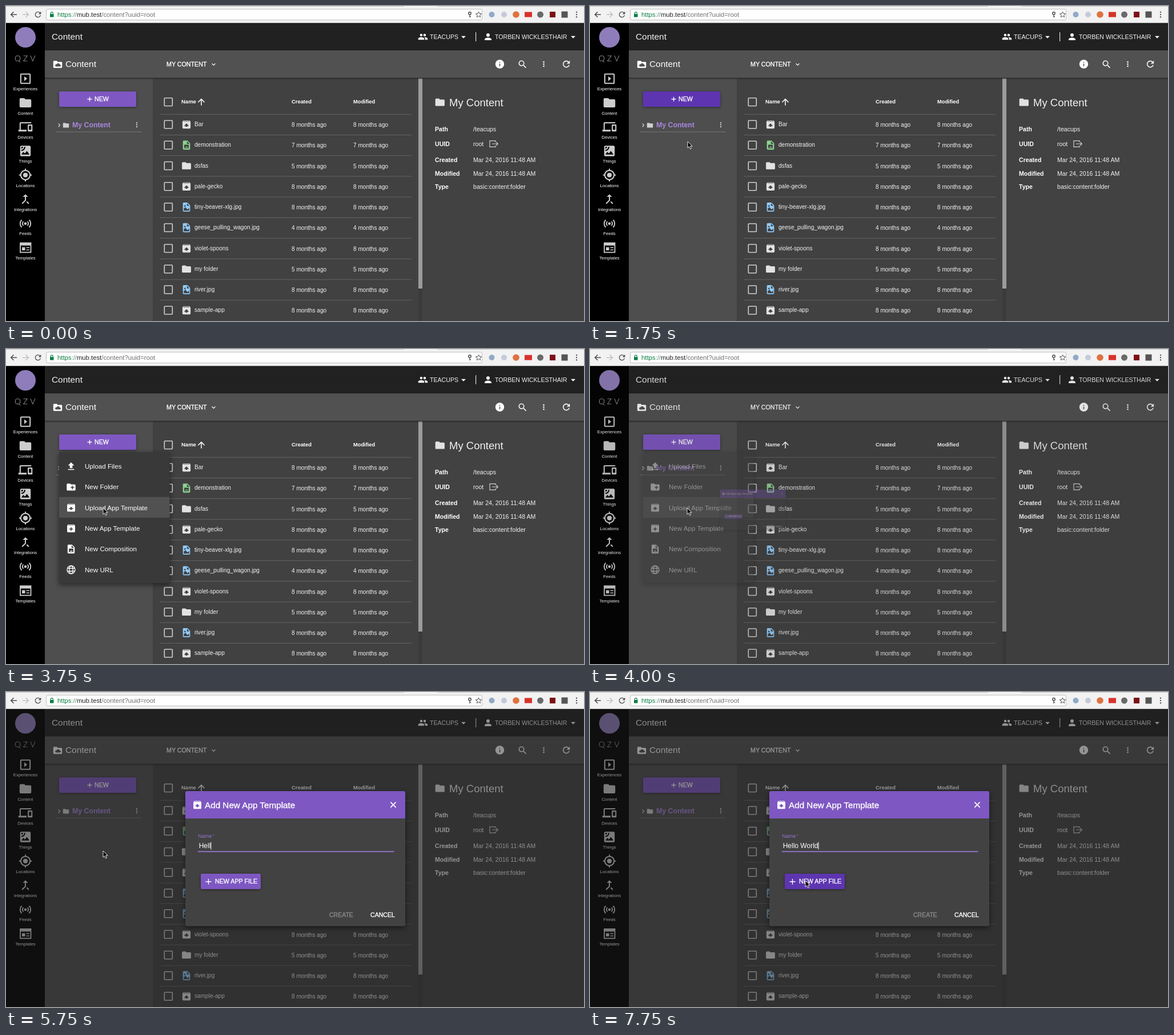
Animation, 1012 px wide and 553 px high, one loop 8 s. Source, as an HTML page:

```html
<!DOCTYPE html>
<html lang="en">
<head>
<meta charset="utf-8">
<title>Content manager</title>
<style>
  html, body { margin: 0; width: 100%; height: 100%; overflow: hidden; background: #424242; }
  svg { display: block; width: 100%; height: 100%; }
  text { font-family: "Liberation Sans", Arial, sans-serif; white-space: pre; }
  .b { font-weight: bold; }
  .m { stroke: currentColor; stroke-width: .35px; }
  .thin { font-family: Lato, "Liberation Sans", sans-serif; font-weight: 300; letter-spacing: 4px; }
  .lift { filter: drop-shadow(0 1px 2px rgba(0,0,0,.45)); }
  .high { filter: drop-shadow(0 3px 5px rgba(0,0,0,.5)); }
</style>
</head>
<body>
<svg id="stage" viewBox="0 0 1012 553"></svg>
<script>
const LOOP = 8000;
const PURPLE = '#7e57c2', DEEP = '#5e35b1', ACCENT = '#9575cd';

// Icon shapes on a 24 unit grid
const BOX = 'M20.55 5.22l-1.39-1.68C18.88 3.21 18.47 3 18 3H6c-.47 0-.88.21-1.15.55L3.46 5.22C3.17 5.57 3 6.01 3 6.5V19c0 1.1.89 2 2 2h14c1.1 0 2-.9 2-2V6.5c0-.49-.17-.93-.45-1.28zM5.12 5l.82-1h12l.93 1z';
const PAGE = 'M14 2H6c-1.1 0-2 .9-2 2v16c0 1.1.9 2 2 2h12c1.1 0 2-.9 2-2V8zM13 3.5V9h5.5z';
const FOLDER = 'M10 4H4c-1.1 0-2 .9-2 2v12c0 1.1.9 2 2 2h16c1.1 0 2-.9 2-2V8c0-1.1-.9-2-2-2h-8z';
const FRAME = 'M19 3H5c-1.1 0-2 .9-2 2v14c0 1.1.9 2 2 2h14c1.1 0 2-.9 2-2V5c0-1.1-.9-2-2-2z';
const SHAPES = {
  folder: FOLDER,
  folderAdd: FOLDER + 'M19 14h-3v3h-2v-3h-3v-2h3V9h2v3h3z',
  folderCloud: FOLDER + 'M8 17h9a2.3 2.3 0 0 0 0-4.6 4 4 0 0 0-7.6-.6A2.7 2.7 0 0 0 8 17z',
  box: BOX + 'M12 9.5l5.5 5.5H14v2h-4v-2H6.5z',
  boxAdd: BOX + 'M11 9.5h2v3h3v2h-3v3h-2v-3H8v-2h3z',
  photo: PAGE + 'M6 20h12v-6l-3.5 3.5L9.5 12 6 15.5zM7 8h3v3H7z',
  scene: PAGE + 'M7 11h10v8H7zM8.5 17.5h7l-2.3-3-1.7 2-1.2-1.3z',
  play: FRAME + 'M19 19H5V5h14zM10 8v8l5-4z',
  things: FRAME + 'M5 5h3a3 3 0 0 1-3 3zM5 12v-2a5 5 0 0 0 5-5h2a7 7 0 0 1-7 7zM5 18l3.5-4.5 2.5 3 3.5-4.5 4.5 6z',
  devices: 'M4 6h18V4H4c-1.1 0-2 .9-2 2v11H0v3h14v-3H4zM23 8h-6a1 1 0 0 0-1 1v10a1 1 0 0 0 1 1h6a1 1 0 0 0 1-1V9a1 1 0 0 0-1-1zM22 17h-4v-7h4z',
  target: 'M12 8a4 4 0 1 0 0 8 4 4 0 0 0 0-8zM20.94 11A9 9 0 0 0 13 3.06V1h-2v2.06A9 9 0 0 0 3.06 11H1v2h2.06A9 9 0 0 0 11 20.94V23h2v-2.06A9 9 0 0 0 20.94 13H23v-2zM12 19a7 7 0 1 1 0-14 7 7 0 0 1 0 14z',
  merge: 'M17 20.4l1.4-1.4-3.4-3.4-1.4 1.4zM7.5 8H11v5.6L5.6 19 7 20.4l6-6V8h3.5L12 3.5z',
  upload: 'M9 16h6v-6h4l-7-7-7 7h4zM5 18h14v2H5z',
  search: 'M15.5 14h-.8l-.3-.3A6.5 6.5 0 1 0 9.5 16c1.6 0 3.1-.6 4.2-1.6l.3.3v.8l5 5 1.5-1.5zM9.5 14a4.5 4.5 0 1 1 0-9 4.5 4.5 0 0 1 0 9z',
  info: 'M12 2a10 10 0 1 0 0 20 10 10 0 0 0 0-20zM13 17h-2v-6h2zM13 9h-2V7h2z',
  reload: 'M17.65 6.35A8 8 0 1 0 19.73 14h-2.08A6 6 0 1 1 16.22 7.78L13 11h7V4z',
  person: 'M12 12a4 4 0 1 0 0-8 4 4 0 0 0 0 8zM12 14c-2.67 0-8 1.34-8 4v2h16v-2c0-2.66-5.33-4-8-4z',
  people: 'M16 11a3 3 0 1 0 0-6 3 3 0 0 0 0 6zM8 11a3 3 0 1 0 0-6 3 3 0 0 0 0 6zM8 13c-2.33 0-7 1.17-7 3.5V19h14v-2.5C15 14.17 10.33 13 8 13zM16 13l-1 .05c1.2.84 2 1.97 2 3.45V19h6v-2.5c0-2.33-4.67-3.5-7-3.5z'
};

const rect = (x, y, w, h, fill, extra = '') =>
  `<rect x="${x}" y="${y}" width="${w}" height="${h}" fill="${fill}" ${extra}/>`;
const dot = (x, y, r, fill) => `<circle cx="${x}" cy="${y}" r="${r}" fill="${fill}"/>`;
const line = (d, color = '#fff', w = 1.5) =>
  `<path d="${d}" fill="none" stroke="${color}" stroke-width="${w}"/>`;
const text = (x, y, s, size, fill = '#f2f2f2', cls = '', extra = '') =>
  `<text x="${x}" y="${y}" font-size="${size}" fill="${fill}" color="${fill}" class="${cls}" ${extra}>${s}</text>`;
const icon = (name, cx, cy, size, fill = '#fff') =>
  `<path transform="translate(${cx - size / 2} ${cy - size / 2}) scale(${size / 24})" fill="${fill}" fill-rule="evenodd" d="${SHAPES[name]}"/>`;
const dots = (x, y, gap, r, fill) => [-gap, 0, gap].map(d => dot(x, y + d, r, fill)).join('');
const plus = (x, y, r) => line(`M${x - r} ${y}h${2 * r}M${x} ${y - r}v${2 * r}`, '#fff', 1.3);
const caretDown = x => `<path d="M${x} 52.7h8l-4 4z" fill="#fff"/>`;
const checkbox = y => rect(277.3, y - 7, 14, 14, 'none', 'stroke="#cfcfcf" stroke-width="1.6" rx="1"');

function star(cx, cy, r) {
  const pts = Array.from({ length: 10 }, (_, i) => {
    const a = i * Math.PI / 5, k = i % 2 ? r * .45 : r;
    return `${cx + k * Math.sin(a)},${cy - k * Math.cos(a)}`;
  });
  return `<polygon points="${pts.join(' ')}" fill="none" stroke="#555" stroke-width="1"/>`;
}

function browserBar() {
  return rect(0, 0, 1012, 30, '#f2f2f2') +
    rect(0, 0, 697, 1, '#c4c4c4') + rect(756, 0, 256, 1, '#c4c4c4') +
    rect(0, 29, 1012, 1, '#b5b5b5') +
    line('M19 15H9M13.5 10.2L8.7 15l4.8 4.8', '#4d4d4d', 1.6) +
    line('M29 15h10M34.5 10.2l4.8 4.8-4.8 4.8', '#c2c2c2', 1.6) +
    icon('reload', 56, 15, 16, '#4d4d4d') +
    rect(70.5, 5.5, 763, 19, '#fff', 'rx="2.5" stroke="#c0c0c0"') +
    rect(77, 14, 6.5, 5.5, '#0b8043', 'rx=".6"') +
    line('M78.3 14.5v-2a1.9 1.9 0 0 1 3.8 0v2', '#0b8043', 1.2) +
    text(90, 19, '<tspan fill="#0b8043">https</tspan><tspan fill="#5c8f73">://</tspan><tspan fill="#222">mub.test</tspan>/content?uuid=root', 11.3, '#707070') +
    `<circle cx="812" cy="12.8" r="2.2" fill="none" stroke="#555" stroke-width="1.6"/>` +
    line('M812 15v5M812 18.6h2', '#555', 1.4) + star(827.5, 15.3, 5.4) +
    dot(850.5, 15, 5, '#91a9c8') + dot(872, 15, 5, '#c6c9dc') + dot(893, 15, 5.8, '#e0713f') +
    rect(908, 10.5, 13, 9, '#d8322a') + dot(935.5, 15, 5.5, '#6a6a6a') +
    rect(952, 10, 10, 10, '#7d1216') + rect(972.5, 9.5, 11, 11, '#555') +
    dots(999, 15, 4.2, 1.2, '#555');
}

function sideNav() {
  const g = '#cdcdcd';
  const items = [['Experiences', 'play'], ['Content', 'folder'], ['Devices', 'devices'], ['Things', 'things'],
    ['Locations', 'target'], ['Integrations', 'merge'], ['Feeds'], ['Templates']];
  const waves = [5, 9].map(r => {
    const k = r * .72;
    return `M${34 - k} ${382 - k}A${r} ${r} 0 0 0 ${34 - k} ${382 + k}M${34 + k} ${382 - k}A${r} ${r} 0 0 1 ${34 + k} ${382 + k}`;
  }).join('');
  return rect(0, 30, 68, 523, '#000') + dot(34, 55, 18, '#8f7dbb') +
    text(15, 96.5, 'QZV', 14, '#c4c4c4', 'thin') +
    items.map(([label, shape], i) => {
      const y = 127.6 + i * 42.3;
      return (shape ? icon(shape, 34, y, 24.5, g) : '') +
        text(34, y + 20.8, label, 7.7, '#fff', '', 'text-anchor="middle"');
    }).join('') +
    dot(34, 382, 2.3, g) + line(waves, g, 1.9) +
    rect(25, 416, 18.5, 16.5, 'none', `stroke="${g}" stroke-width="1.8"`) + rect(25, 416, 18.5, 4.5, g) +
    rect(28, 423.5, 5.5, 5.5, g) + line('M35.5 424.3h5.5M35.5 428.2h5.5', g, 1.5);
}

function headers() {
  return rect(68, 30, 944, 48, '#212121') + text(80, 59, 'Content', 15.4) +
    icon('people', 730, 54, 18) + text(742, 58, 'TEACUPS', 10.6) + caretDown(797) +
    rect(822, 46, 1.2, 16, '#ddd') +
    icon('person', 844, 54, 18) + text(856, 58, 'TORBEN WICKLESTHAIR', 10.6) + caretDown(989) +
    rect(68, 78, 944, 48, '#515151') +
    icon('folderCloud', 90.5, 102.5, 18.5) + text(104, 107, 'Content', 15.4, '#fff') +
    text(281, 106, 'MY CONTENT', 10.7, '#fff', 'm') + line('M360.5 101l3 3 3-3', '#eee', 1.3) +
    icon('info', 864.5, 102, 18.5) + icon('search', 904.5, 102.5, 18.5) +
    dots(941.5, 102, 3.8, 1.3, '#fff') + icon('reload', 981, 102, 18.5);
}

function tree() {
  return rect(68, 126, 189, 427, '#4e4e4e') +
    rect(93, 150, 135, 27, PURPLE, 'id="newBtn" rx="2" class="lift"') +
    plus(146.5, 163.5, 4) + text(155, 167, 'NEW', 10.7, '#fff', 'm') +
    line('M91.5 206.3l3 3-3 3', '#ddd', 1.2) + icon('folder', 105, 209.3, 12.5, '#cfcfcf') +
    text(116, 212.5, 'My Content', 12.3, '#a886de', 'b') + dots(229, 208.7, 3.5, 1.1, '#ddd') +
    rect(87, 220.5, 151, 1, '#777');
}

function fileList() {
  const light = '#e2e2e2', blue = '#90caf9', green = '#8bd08f';
  const rows = [['Bar', 'box', 8], ['demonstration', 'scene', 7, green], ['dsfas', 'folder', 5],
    ['pale-gecko', 'box', 8], ['tiny-beaver-xlg.jpg', 'photo', 8, blue],
    ['geese_pulling_wagon.jpg', 'photo', 4, blue], ['violet-spoons', 'box', 8],
    ['my folder', 'folder', 5], ['river.jpg', 'photo', 8, blue], ['sample-app', 'box', 8]];
  return rect(257, 126, 465, 427, '#414141') + checkbox(168.5) +
    text(307, 171, 'Name', 9.5, '#fff', 'b') + line('M342 174.5v-11M336.5 169l5.5-5.6 5.5 5.6', '#fff', 1.5) +
    text(500, 171, 'Created', 9.4, '#fff', 'b') + text(608, 171, 'Modified', 9.3, '#fff', 'b') +
    rows.map(([name, shape, age, color = light], i) => {
      const y = 208 + i * 36.25, when = age + ' months ago';
      return rect(269, y - 18.3, 441, 1, '#646464') + checkbox(y) + icon(shape, 316, y, 19, color) +
        text(330, y + 3.2, name, 10.1) + text(500, y + 4, when, 10.1) + text(608, y + 4, when, 10.1);
    }).join('') +
    rect(722, 126, 7, 427, '#3b3b3b') + rect(722, 126, 7, 370, '#9b9b9b');
}

function details() {
  const rows = [['Path', '/teacups', 219.7], ['UUID', 'root', 245.5], ['Created', 'Mar 24, 2016 11:48 AM', 274.3],
    ['Modified', 'Mar 24, 2016 11:48 AM', 297.7], ['Type', 'basic:content:folder', 321.3]];
  return rect(729, 126, 283, 427, '#424242') + icon('folder', 759.8, 169, 19.5, '#e2e2e2') +
    text(776, 175.5, 'My Content', 18.5) +
    rows.map(([k, v, y]) => text(751, y, k, 10.6, '#fff', 'b') + text(818, y, v, 10.6)).join('') +
    line('M857 239v-2.3h-10v10.6h10V245M851 242h10M858.3 239l3 3-3 3', '#cfcfcf', 1.2) +
    rect(68, 126, 944, 1.2, '#2c2c2c') + rect(68, 127, 944, 2, '#000', 'opacity=".14"');
}

function menu() {
  const items = [['Upload Files', 'upload'], ['New Folder', 'folderAdd'], ['Upload App Template', 'box'],
    ['New App Template', 'boxAdd'], ['New Composition', 'scene'], ['New URL']];
  const globe = '<g fill="none" stroke="#fff" stroke-width="1.3"><circle cx="114" cy="387.5" r="7"/>' +
    '<ellipse cx="114" cy="387.5" rx="3.2" ry="7"/><path d="M107.6 385h12.8M107.6 390h12.8"/></g>';
  return '<g id="menu">' + rect(93, 181, 193.5, 230, '#393939', 'rx="2" class="high"') +
    rect(93, 187, 193.5, 36.3, '#fff', 'id="hover"') +
    items.map(([label, shape], i) => {
      const y = 206 + i * 36.3;
      return (shape ? icon(shape, 114, y, 18.5) : globe) + text(138, y + 4, label, 11.6, '#fff');
    }).join('') + '</g>';
}

function dialog() {
  return '<g id="dialog">' + rect(314, 174, 385, 237, '#424242', 'rx="3" class="high"') +
    `<path d="M314 222v-45a3 3 0 0 1 3-3h379a3 3 0 0 1 3 3v45z" fill="${PURPLE}"/>` +
    icon('box', 335, 198.3, 18.5) + text(348, 203.5, 'Add New App Template', 15.25, '#fff', 'm') +
    line('M673.3 193.3l9.4 9.4M682.7 193.3l-9.4 9.4', '#fff', 1.7) +
    '<g id="idle">' + text(337, 276, 'Name', 12, '#b4b4b4') + text(372, 274, '*', 9, '#b4b4b4') +
    rect(336, 280, 344, 1, '#757575') + '</g>' +
    '<g id="focus">' + text(336.5, 255.8, 'Name', 9, ACCENT) + text(362, 254.5, '*', 7, ACCENT) +
    rect(336, 279.3, 343.5, 1.8, ACCENT) + text(337.7, 274.3, '', 12, '#fff', '', 'id="field"') +
    rect(338, 263.5, 1, 13, '#fff', 'id="caret"') + '</g>' +
    rect(341, 319, 105, 27, PURPLE, 'id="fileBtn" rx="2" class="lift"') +
    plus(354.5, 333, 5) + text(366, 336, 'NEW APP FILE', 10.7, '#fff', 'm') +
    text(566, 395.3, 'CREATE', 10.5, '#8c8c8c', 'm') + text(638, 395.3, 'CANCEL', 10.6, '#fff', 'm') + '</g>';
}

const stage = document.getElementById('stage');
stage.innerHTML = browserBar() + headers() + tree() + fileList() + details() + sideNav() +
  rect(0, 30, 1012, 523, '#212121', 'id="shade"') + menu() + dialog() +
  '<path id="cursor" d="M0 0v11.2l2.6-2.4 1.9 4.2 2-.9-1.9-4.1h3.6z" fill="#000" stroke="#fff" stroke-width=".9"/>';

const el = {};
stage.querySelectorAll('[id]').forEach(n => el[n.id] = n);

// Each step changes only the values it names; the screen holds still in between
const STEPS = [
  [0, { pos: null, btn: PURPLE, file: PURPLE, menu: 0, row: 0, glow: 0, shade: 0, zoom: 0, focus: false, typed: '' }],
  [1500, { pos: [172, 99] }],
  [1750, { pos: [171, 238], btn: DEEP }],
  [2000, { pos: [172, 182], btn: PURPLE }],
  [2250, { pos: [172, 168], btn: DEEP }],
  [2500, { menu: .6, glow: .04 }],
  [2750, { pos: [172, 175], menu: 1, btn: '#6a40b6' }],
  [3000, { pos: [172, 196], btn: PURPLE, glow: .1 }],
  [3250, { pos: [171, 240], row: 1 }],
  [3500, { pos: [170, 274], row: 2 }],
  [3750, { pos: [170, 279], glow: .12 }],
  [4000, { menu: .4, shade: .25, zoom: .3 }],
  [4250, { menu: 0, shade: 1, zoom: 1 }],
  [4500, { focus: true }],
  [5250, { typed: 'H' }],
  [5500, { typed: 'He' }],
  [5750, { typed: 'Hell' }],
  [6000, { typed: 'Hello ' }],
  [6250, { typed: 'Hello W' }],
  [6500, { typed: 'Hello Worl' }],
  [6750, { typed: 'Hello World' }],
  [7250, { pos: [260, 306] }],
  [7500, { pos: [360, 333], file: '#6a40b6' }],
  [7750, { pos: [377, 331], file: DEEP }]
];

const show = (node, opacity) => {
  node.style.display = opacity ? '' : 'none';
  node.setAttribute('opacity', opacity);
};
const mix = (a, b, k) => a + (b - a) * k;

function draw(t) {
  const s = Object.assign({}, ...STEPS.filter(([at]) => at <= t).map(([, change]) => change));
  show(el.cursor, s.pos ? 1 : 0);
  if (s.pos) el.cursor.setAttribute('transform', `translate(${s.pos})`);
  el.newBtn.setAttribute('fill', s.btn);
  el.fileBtn.setAttribute('fill', s.file);
  show(el.menu, s.menu);
  show(el.hover, s.glow);
  el.hover.setAttribute('y', 187 + s.row * 36.4);
  show(el.shade, s.shade * .48);
  show(el.dialog, s.zoom);
  el.dialog.setAttribute('transform',
    `translate(${mix(190, 506.5, s.zoom)} ${mix(278, 292.5, s.zoom)}) scale(${s.zoom}) translate(-506.5 -292.5)`);
  show(el.idle, s.focus ? 0 : 1);
  show(el.focus, s.focus ? 1 : 0);
  if (el.field.textContent !== s.typed) el.field.textContent = s.typed;
  if (s.focus) el.caret.setAttribute('x', 337.7 + (s.typed ? el.field.getComputedTextLength() : 0));
}

const start = performance.now();
function tick() {
  draw((performance.now() - start) % LOOP);
  requestAnimationFrame(tick);
}
tick();
</script>
</body>
</html>
```
